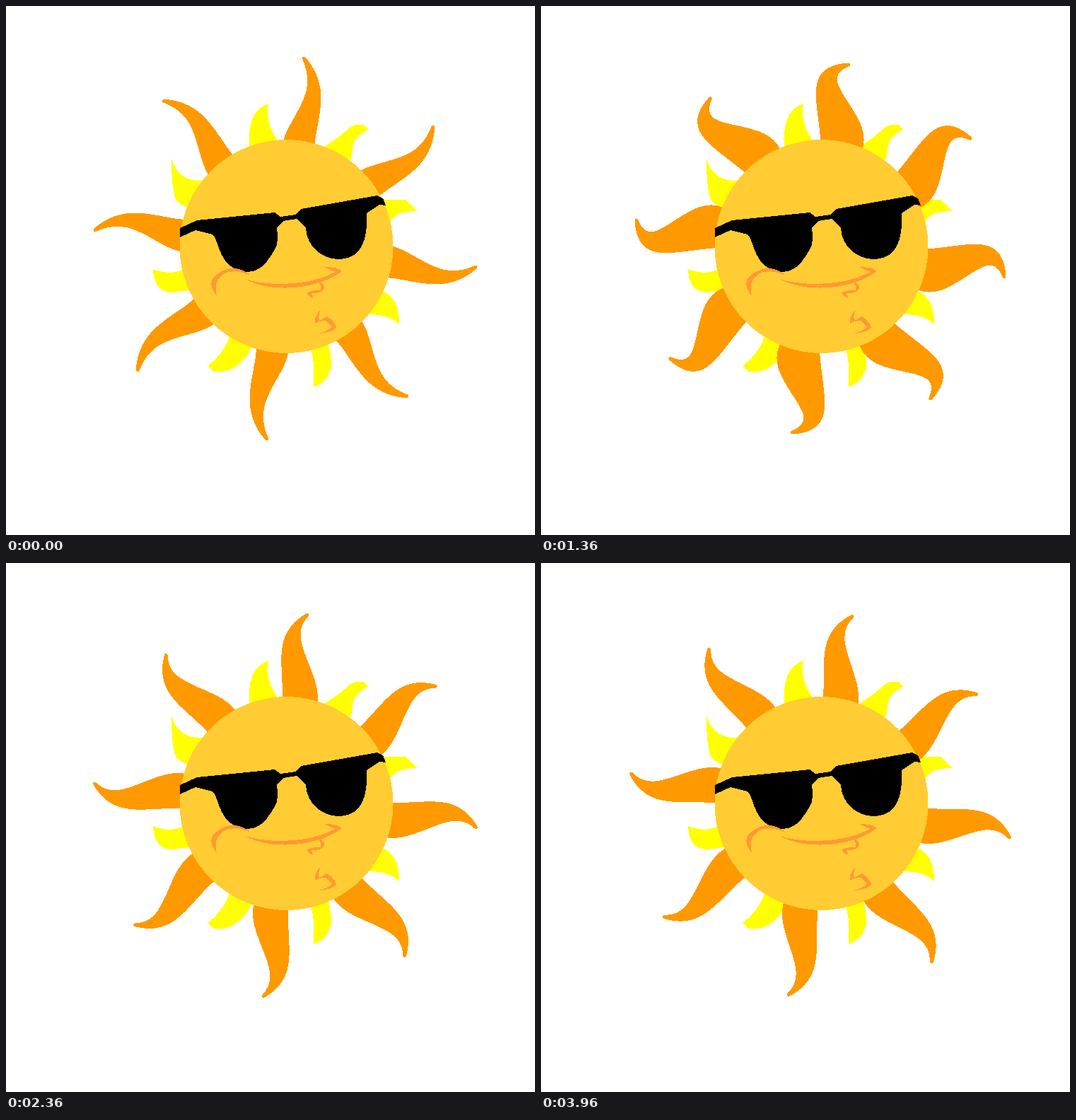
Recreate the animation shown at these times as an HTML page. Size 748 by 748 pixels, loop 4 s.

```html
<!DOCTYPE html>
<html lang="en">
<head>
<meta charset="utf-8">
<title>Cool sun</title>
<style>
  html, body { margin: 0; width: 100%; height: 100%; overflow: hidden; background: #fff; }
  svg { display: block; width: 100%; height: 100%; shape-rendering: crispEdges; }
  #rays { fill: #f90; stroke: #f90; stroke-width: 5; stroke-linejoin: round; }
</style>
</head>
<body>
<svg viewBox="0 0 748 748">
  <path fill="#ff0" d="
    M344 200Q342 170 351 154Q359 142 371 138Q366 165 384 190L380 210Z
    M450 199Q472 185 479 178Q488 169 495 168L506 168L512 175Q494 184 491 196L488 217L470 220Z
    M534 274L566 274L581 290Q550 290 543 306L530 300Z
    M532 403Q556 412 556 450Q542 436 513 436Z
    M456 478Q461 500 460 512L453 527Q445 535 435 539Q437 505 431 485Z
    M316 467Q309 490 285 509L293 517Q327 522 348 482Z
    M249 373Q232 381 208 372Q209 405 236 405L259 402Z
    M279 247Q244 249 234 216Q234 272 244 278L255 285Z"/>
  <path id="rays"/>
  <circle cx="396.5" cy="340" r="151" fill="#fc3"/>
  <path d="M246 314L270 303L380 292L388 298L410 295L417 287L525 268L533 272L537 282L528 281L510 293
    C512 335 500 358 470 358C446 358 425 339 424 314L411 301L392 304L383 313
    C386 340 381 342 376 351C366 367 356 376 342 376C300 374 302 331 292 323L268 317L246 327Z"/>
  <path fill="#f93" d="
    M298 410C288 398 287 387 299 379C314 368 331 368 346 381C329 374 316 373 306 380C296 388 295 396 298 410Z
    M450 369Q469 369 475 375C440 402 372 406 338 386C372 397 430 396 466 376Q458 374 450 369Z
    M442 390Q452 393 450 400Q444 407 432 406L434 413Q426 410 426 405Q430 402 445 402Q446 396 442 390Z
    M445 429Q435 440 437 449Q446 444 453 445L461 454Q453 461 442 463Q461 462 467 454Q463 445 454 439L443 445Q441 438 445 429Z"/>
</svg>
<script>
const LOOP = 4000, STEP = 40, SWAYS = 13, RAYS = 8;
const CENTER_X = 395, CENTER_Y = 343, FIRST_ANGLE = 7.5;
const rays = document.getElementById('rays');

// A ray is two cubic curves: foot, two handles, tip, two handles, foot.
// Each point is [sideways, outwards] from the centre of the sun.
const bent = [[-21, 140], [-22, 182], [24, 218], [-9, 270], [40, 228], [12, 170], [21, 140]];
const wavy = [[-21, 140], [-22, 190], [-52, 235], [-5, 271], [-36, 230], [31, 190], [23, 140]];
const curled = [[-17, 140], [-30, 205], [-62, 250], [1, 263], [-54, 232], [56, 195], [33, 140]];

const clamp = v => Math.max(0, Math.min(1, v));
const mix = (a, b, k) => a.map((p, i) => p.map((v, axis) => v + (b[i][axis] - v) * k));

// Each sway goes bent, wavy, curled and back the same way.
function rayAt(t) {
  const phase = t * SWAYS % 1, d = Math.min(phase, 1 - phase);
  return mix(mix(bent, wavy, clamp(d / 0.13)), curled, clamp((d - 0.33) / 0.08));
}

// One turn counter-clockwise per loop, a little faster at first.
const turn = t => FIRST_ANGLE - 360 * (t + 0.144 * t * (1 - t));

function rayPath(points, degrees) {
  const a = degrees * Math.PI / 180, c = Math.cos(a), s = Math.sin(a);
  const [foot, ...curves] = points.map(([u, v]) =>
    `${(CENTER_X + u * c + v * s).toFixed(2)} ${(CENTER_Y + u * s - v * c).toFixed(2)}`);
  return `M${foot}C${curves.join(' ')}Z`;
}

function draw(now) {
  const t = Math.floor(now % LOOP / STEP) * STEP / LOOP;
  const ray = rayAt(t);
  let d = '';
  for (let i = 0; i < RAYS; i++) d += rayPath(ray, turn(t) + i * 360 / RAYS);
  rays.setAttribute('d', d);
}

const start = performance.now();
function tick() {
  draw(performance.now() - start);
  requestAnimationFrame(tick);
}
tick();
</script>
</body>
</html>
```
